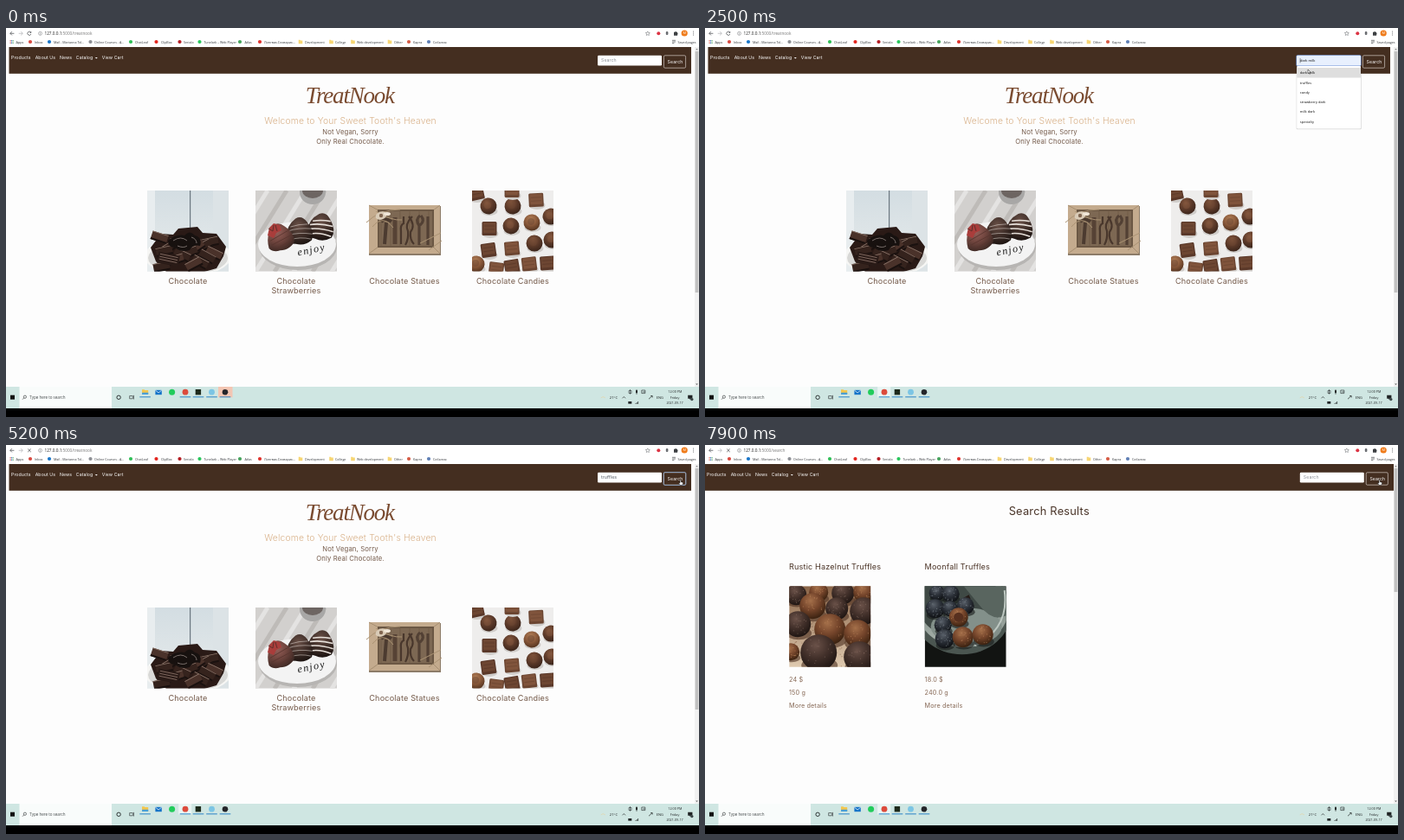
An HTML page for the animation above (8000 ms loop, 800 by 450 pixels).

```html
<!DOCTYPE html>
<html lang="en">
<head>
<meta charset="utf-8">
<title>Sweet shop search</title>
<style>
  html, body { margin: 0; width: 100%; height: 100%; overflow: hidden; background: #000; }
  svg { display: block; width: 800px; height: 450px; }
  text { white-space: pre; }
  .ui { font-family: "Open Sans", "Noto Sans", sans-serif; }
  .web { font-family: Inter, "Open Sans", sans-serif; letter-spacing: .018em; }
  .script { font-family: "Liberation Serif", "Noto Serif", serif; font-style: italic; }
</style>
</head>
<body>
<svg id="stage" viewBox="0 0 800 450" xmlns="http://www.w3.org/2000/svg"></svg>
<script>
const LOOP = 8000, STEP = 100;
const stage = document.getElementById('stage');

// Markup helpers
const rect = (x, y, w, h, fill, more = '') =>
  `<rect x="${x}" y="${y}" width="${w}" height="${h}" fill="${fill}" ${more}/>`;
const ball = (x, y, r, fill, more = '') => `<circle cx="${x}" cy="${y}" r="${r}" fill="${fill}" ${more}/>`;
const oval = (x, y, rx, ry, fill, more = '') =>
  `<ellipse cx="${x}" cy="${y}" rx="${rx}" ry="${ry}" fill="${fill}" ${more}/>`;
const shape = (d, fill, more = '') => `<path d="${d}" fill="${fill}" ${more}/>`;
const line = (d, color, w = 0.7, more = '') =>
  `<path d="${d}" fill="none" stroke="${color}" stroke-width="${w}" ${more}/>`;
const text = (x, y, size, fill, str, cls = 'web', more = '') =>
  `<text x="${x}" y="${y}" font-size="${size}" fill="${fill}" class="${cls}" ${more}>${str}</text>`;
const mid = (x, y, size, fill, str, cls = 'web', more = '') =>
  text(x, y, size, fill, str, cls, 'text-anchor="middle" ' + more);
const group = (id, body) => `<g id="${id}">${body}</g>`;
const turn = (a, x, y) => `transform="rotate(${a} ${x} ${y})"`;
const place = (x, y, a, body) => `<g transform="translate(${x} ${y}) rotate(${a})">${body}</g>`;
const photo = (id, x, y, body) =>
  `<clipPath id="${id}"><rect width="94" height="93.6"/></clipPath>` +
  `<g transform="translate(${x} ${y})"><g clip-path="url(#${id})">${body}</g></g>`;

function seeded(seed) {
  return () => (seed = (seed * 16807) % 2147483647) / 2147483647;
}

const glow = (id, light, base, dark) =>
  `<radialGradient id="${id}" cx=".42" cy=".3" r=".72"><stop offset="0" stop-color="${light}"/>` +
  `<stop offset=".5" stop-color="${base}"/><stop offset="1" stop-color="${dark}"/></radialGradient>`;
const fade = (id, top, bottom) =>
  `<linearGradient id="${id}" x2="0" y2="1"><stop stop-color="${top}"/>` +
  `<stop offset="1" stop-color="${bottom}"/></linearGradient>`;

const defs = '<defs>' +
  glow('cocoa', '#a5704a', '#75452b', '#38200f') +
  glow('dark', '#6a5148', '#42302a', '#1d1411') +
  glow('nut', '#b28058', '#8b5a3b', '#54331f') +
  glow('milk', '#87593f', '#5e3b2a', '#3a241a') +
  glow('ink', '#596069', '#2b3038', '#0d0f12') +
  glow('berry', '#95605a', '#71463f', '#402a25') +
  fade('wall', '#d3dde2', '#e8ecec') +
  fade('sand', '#8a6548', '#dfcab0') +
  fade('bowl', '#65716c', '#a9b4ad') +
  '</defs>';

// Browser frame
function browser() {
  const folder = x => shape(`M${x - 2.3} 13.8h1.8l.6 .7h2.2v3.8h-4.6z`, '#f7d673');
  const dot = c => x => ball(x, 16, 2.1, c);
  const marks = [
    [28, 33, 'Inbox', dot('#d9493f')],
    [50, 55, 'Mail - Marianna Tol…', dot('#1976c9')],
    [97.5, 102, 'Online Courses - A…', dot('#8d8f94')],
    [144, 149, 'ChatLeaf', dot('#2fbf57')],
    [173.5, 179, 'ClipBox', dot('#e3251e')],
    [200.5, 205, 'Serialo', dot('#b51c22')],
    [223.5, 228.5, 'Tunelark – Web Player', dot('#28c65c')],
    [270, 275.5, 'Atlas', dot('#45a35c')],
    [293, 298, 'Лингвик.Словарик…', dot('#e0322c')],
    [340, 345, 'Development', folder],
    [375.5, 380, 'College', folder],
    [400.5, 405, 'Web development', folder],
    [443, 448, 'Other', folder],
    [465, 470, 'Карта', dot('#d65a43')],
    [488, 493, 'События', dot('#5f7fb5')]
  ];
  let s = rect(0, 0, 800, 22, '#fff');
  s += line('M9.4 6.3H4.8M6.9 4.2L4.8 6.3L6.9 8.4', '#4b4e52', 0.75);
  s += line('M14.7 6.3H19.3M17.2 4.2L19.3 6.3L17.2 8.4', '#b4b6b9', 0.75);
  s += group('reload', line('M28.6 4.9A2.1 2.1 0 1 0 28.9 7', '#4b4e52', 0.75) + shape('M29.2 3.7v2h-2z', '#4b4e52'));
  s += group('stop', line('M25.2 4.5L28.8 8.1M28.8 4.5L25.2 8.1', '#4b4e52', 0.75));
  s += line('M37.5 6.3a2 2 0 1 0 4 0a2 2 0 1 0 -4 0M39.5 6v1.4M39.5 5v.5', '#6a6d71', 0.5);
  s += '<text x="44.5" y="8" font-size="4.7" class="ui" fill="#222">127.0.0.1<tspan id="path" fill="#777"></tspan></text>';
  s += line('M740.8 3.8l.75 1.6 1.75.2-1.3 1.2.35 1.7-1.55-.85-1.55.85.35-1.7-1.3-1.2 1.75-.2z', '#5d6064', 0.5);
  s += ball(753.3, 6.2, 2, '#dc3444') + rect(761.8, 4, 2.6, 4, '#6a6d71', 'rx="1"');
  s += shape('M771 4.8h1.3a.8 .8 0 0 1 1.6 0h1.2v1.3a.8 .8 0 0 1 0 1.5v1.2h-4.1z', '#3d4043');
  s += ball(783.2, 6, 3.6, '#ef7b1a') + mid(783.2, 7.4, 4, '#fff', 'M', 'ui');
  s += [4, 6, 8].map(y => ball(793.6, y, 0.55, '#55585c')).join('');
  for (let i = 0; i < 9; i++)
    s += rect(4.6 + (i % 3) * 1.5, 14 + Math.floor(i / 3) * 1.5, 1, 1, ['#d65548', '#4a86d8', '#4da25d'][i % 3]);
  s += text(11.5, 17.5, 3.8, '#33363a', 'Apps', 'ui');
  for (const [ix, tx, label, icon] of marks) s += icon(ix) + text(tx, 17.5, 3.65, '#33363a', label, 'ui');
  s += line('M769 14.3h4M769 16h4M769 17.7h2.4', '#4b4e52', 0.7) + text(775.5, 17.5, 3.65, '#33363a', 'Saved pages', 'ui');
  s += rect(795, 22, 5, 393, '#f1f1f1') + rect(795.6, 27, 3.8, 279, '#c1c1c1', 'id="thumb"');
  s += shape('M796.2 25.3h2.6l-1.3-1.5z', '#777') + shape('M796.2 411.5h2.6l-1.3 1.5z', '#555');
  return s;
}

// Taskbar
function taskbar() {
  const ink = '#202425';
  let s = rect(0, 415, 800, 25, '#cfe6e2') + rect(0, 440, 800, 10, '#000');
  s += rect(15.5, 415, 106.5, 25, '#f9fcfb') + rect(5, 424.7, 5, 5, '#111');
  s += line('M20.3 426.7a1.6 1.6 0 1 0 3.2 0a1.6 1.6 0 1 0 -3.2 0M20.8 427.9L19 429.7', ink, 0.6);
  s += text(27.3, 428.9, 4.5, '#44494a', 'Type here to search', 'ui');
  s += line('M127.9 427.3a2.2 2.2 0 1 0 4.4 0a2.2 2.2 0 1 0 -4.4 0', ink, 0.9);
  s += line('M142.7 425.6h3.6v3.2h-3.6zM147.5 424.9v4.6', ink, 0.6);
  s += group('alert', rect(245, 415, 16.5, 12.3, '#f3c6b3'));
  s += group('active', rect(199.2, 415, 15, 12.3, '#e9f5f3'));
  s += shape('M157 418.2h2.6l.8 .8h3.8v5h-7.2z', '#f3c64d') + rect(157, 421.7, 7.2, 2.3, '#4b9fd4', 'rx=".5"');
  s += rect(172.4, 418.8, 7.4, 5.4, '#1473c8') + line('M172.4 419l3.7 3 3.7-3', '#fff', 0.7);
  s += ball(191.6, 421.2, 3.5, '#22cc5b') + ball(207, 421.2, 3.4, '#dc4b3c');
  s += rect(218.7, 418, 6.4, 6.4, '#1d2a1b');
  s += ball(237.5, 421.2, 3.4, '#7cc5e4') + ball(253, 421.2, 3.3, '#24252a');
  for (const x of [160.6, 207, 222, 237.5, 253]) s += rect(x - 6.3, 426.4, 12.6, 0.9, '#1877c2');
  s += line('M686.8 427.8q2.3 -2.4 5 0', '#e3d7ad', 0.8) + text(696.7, 429, 4.3, ink, '21°C', 'ui');
  s += line('M711.5 428.3l1.8-1.8 1.8 1.8', ink, 0.65);
  s += line('M719 419.5h3v3h-3zM720.5 418v5.7', ink, 0.55) + rect(727, 418.4, 2, 4, ink, 'rx="1"');
  s += line('M728 422.3v1.6', ink, 0.6) + line('M733.8 419h4v3.6h-4zM735 421h3', ink, 0.6);
  s += rect(718.3, 432, 4, 2.7, ink) + line('M727 435v-1M728.3 435v-2M729.6 435v-3', ink, 0.7);
  s += line('M742 429.2l4-3.6M744.2 425.5h2v2', ink, 0.7);
  s += text(750.8, 429, 4, ink, 'ENG', 'ui');
  s += mid(772.3, 422.3, 3.7, ink, '12:00 PM', 'ui') + mid(772, 428.9, 3.7, ink, 'Friday', 'ui');
  s += mid(772, 435.4, 3.7, ink, '2021-09-17', 'ui');
  s += shape('M787.2 424.7h5.2v4.1h-2l-1.2 1.3v-1.3h-2z', ink) + ball(791.8, 429.6, 1.7, '#3a4546');
  return s;
}

// Photographs, each drawn in a 94 by 93.6 box
function chocolatePile() {
  const rnd = seeded(29);
  let s = rect(0, 0, 94, 94, 'url(#wall)') + rect(0, 0, 9, 94, '#e8edef') + rect(76, 0, 18, 94, '#dce3e6');
  s += oval(47, 76, 50, 23, '#f6f6f4') + oval(47, 78, 46, 19, '#d9d9d7') + rect(49, 0, 1.2, 46, '#6b7780');
  s += shape('M4 66L16 50 30 51 36 44 58 42 64 49 80 50 91 65 88 76 80 90 66 94H22L10 82z', '#2a1a16');
  for (let i = 0; i < 17; i++) {
    const x = 14 + (i * 29) % 66, y = 53 + i * 2 + rnd() * 4, a = -35 + rnd() * 65;
    s += place(x, y.toFixed(1), a.toFixed(0),
      rect(-9, -4, 19, 10, i % 3 ? '#35231d' : '#4a322a') + rect(-9, -4, 19, 0.8, '#8a7469') + rect(-9, 4, 19, 2.2, '#1a110f'));
  }
  s += shape('M24 58Q34 50 43 52Q49 45 55 52Q64 54 61 64Q53 62 49 69Q39 72 32 66Q24 66 24 58z', '#17110f');
  s += line('M30 58q9 -6 16 0M51 54q6 2 6 7M35 64q7 3 11 0', '#857a75', 0.9);
  s += `<g ${turn(12, 25, 79)}>` + rect(12, 73, 25, 13, '#2a1b17') +
    line('M14 75.5h21M14 78.5h21M14 81.5h21', '#9b8075', 0.7) + '</g>';
  return s;
}

function berries() {
  let s = rect(0, 0, 94, 94, '#d2d0ce');
  for (let i = -3; i < 6; i++) s += line(`M${i * 22} 94L${i * 22 + 58} 0`, i % 2 ? '#bebbb8' : '#e4e3e2', 5);
  s += oval(66, 2, 15, 14, '#a8a7a6') + oval(66, 0, 12, 9, '#6d6562') + oval(49, 65, 45, 27, '#b7b5b3') + oval(48, 62, 45, 26, '#f3f3f3');
  const fruit = (x, y, a, fill, stripe) => place(x, y, a,
    shape('M-15 11Q-16 -4 -6 -13Q1 -18 8 -10Q18 0 15 10Q7 18 -3 16Q-11 17 -15 11z', fill) + stripe);
  const drizzle = w => line('M-11 -3Q-2 -7 9 -8M-13 2Q-2 -3 13 -3M-13 7Q-1 2 15 3M-10 12Q1 7 14 9', '#e6dfd9', w);
  s += fruit(76, 41, 15, 'url(#dark)', drizzle(1.6)) + fruit(51, 46, 5, 'url(#dark)', drizzle(0.5));
  s += fruit(28, 53, -12, 'url(#berry)', line('M-12 3L12 -5M-11 8L14 1M-6 13L13 7', '#59352f', 0.8));
  s += shape('M14 52l2 -9 5 -5 7 2 2 6 -6 3 -3 6z', '#a93d3b') + line('M15 44l5 3 1 -7M23 40l2 7', '#5f302c', 1);
  s += mid(65, 72, 12, '#171717', 'enjoy', 'script', 'letter-spacing="1.4" ' + turn(-12, 66, 70));
  return s;
}

function toolBox() {
  let s = rect(0, 0, 94, 94, '#fdfdfd') + rect(6, 18, 83, 57, '#8c7c69') + rect(6, 17, 82, 56, '#c4ab8e');
  s += line('M6 17L17 23M88 17L80 23M6 73L17 65M88 73L80 65', '#9f876a', 0.8);
  s += rect(16, 22, 65, 44, '#6b5744') + rect(18, 24, 61, 40, '#7d6853');
  for (let i = 0; i < 6; i++) s += line(`M${20 + i * 11} 24v40`, '#725d49', 1);
  s += line('M24 62L26 37M20 36q6 -5 12 0', '#4c3b30', 4) + line('M36 62V31', '#564235', 5);
  s += line('M46 30v8q-4 2 -3 9v15M56 30q-9 9 -5 17 1 9 -3 16M52 30q8 10 2 18 -1 9 4 14', '#49372c', 2.2);
  s += line('M64 63V41q-5 -8 1 -12M65 40q6 -5 1 -11M74 63V30', '#524034', 3.2);
  s += line('M3 37Q18 22 42 22M10 42Q22 27 34 43M14 24Q31 35 44 34M65 61L89 49M75 69L90 58', '#aa9273', 1);
  s += oval(20, 29, 6.5, 4.5, '#d9cbb7', turn(-20, 20, 29)) + ball(20, 29, 2.2, '#816651') + oval(27, 27, 4, 2, '#f0e6d8');
  return s;
}

function candies() {
  // x, y, square or round
  const spots = [
    [5, 3, 1], [19, 18, 0], [47, 18, 0], [74, 11, 1], [20, 44, 1], [45, 41, 0], [69, 37, 0], [91, 30, 0],
    [19, 69, 1], [46, 67, 1], [72, 61, 0], [92, 57, 0], [5, 85, 0], [28, 91, 1], [46, 88, 1], [66, 85, 1],
    [87, 84, 1], [46, 0, 1]
  ];
  return rect(0, 0, 94, 94, '#eeedec') + spots.map(([x, y, square], i) => {
    const base = i % 2 ? '#6b4531' : '#5a3829', top = i % 2 ? '#80543c' : '#6d4632';
    const body = square
      ? rect(x - 8.5, y - 8, 17, 16, base, 'rx="1.5"') + rect(x - 7, y - 7, 14, 12, top, 'rx="1"') +
        line(`M${x - 6} ${y - 3}h12M${x - 6} ${y + 1}h12`, base, 0.7)
      : ball(x, y, 9.5, `url(#${i % 3 ? 'milk' : 'nut'})`) + ball(x - 1, y - 1, 4, top, 'opacity=".5"');
    return oval(x + 1, y + 6, 9.5, 5, '#cfccc9') + `<g ${turn((i * 23) % 20 - 12, x, y)}>${body}</g>`;
  }).join('');
}

function speckle(x, y, r, n, color, rnd) {
  let s = '';
  for (let i = 0; i < n; i++) {
    const a = rnd() * 6.28, d = Math.sqrt(rnd()) * r * 0.85;
    s += ball((x + Math.cos(a) * d).toFixed(1), (y + Math.sin(a) * d).toFixed(1), 0.6, color, 'opacity=".55"');
  }
  return s;
}

// Rolled sweets: x, y, radius, tone
const roll = (balls, shade, dust, rnd) => balls.map(([x, y, r, tone]) =>
  oval(x + 1, y + r * 0.7, r, r * 0.5, shade, 'opacity=".6"') + ball(x, y, r, `url(#${tone})`) +
  speckle(x, y, r, 18, tone === 'cocoa' ? '#c18a60' : dust, rnd)).join('');

function truffleTray() {
  const rnd = seeded(71);
  const balls = [
    [8, 10, 12, 'dark'], [34, 7, 11, 'cocoa'], [62, 8, 13, 'dark'], [86, 7, 12, 'cocoa'],
    [27, 23, 15, 'cocoa'], [55, 26, 13, 'dark'], [86, 29, 16, 'dark'], [10, 44, 15, 'dark'],
    [47, 50, 18, 'cocoa'], [79, 55, 16, 'cocoa'], [34, 77, 21, 'dark'], [81, 82, 18, 'dark'], [2, 76, 10, 'cocoa']
  ];
  return rect(0, 0, 94, 94, 'url(#sand)') + speckle(47, 75, 55, 90, '#795139', rnd) + roll(balls, '#4c3020', '#8c7468', rnd);
}

function truffleBowl() {
  const balls = [
    [14, 8, 9, 'ink'], [30, 9, 10, 'ink'], [47, 23, 10, 'ink'], [12, 26, 11, 'ink'], [29, 26, 9, 'ink'],
    [39, 36, 11, 'cocoa'], [21, 45, 10, 'ink'], [23, 61, 11, 'ink'], [44, 59, 12, 'cocoa'], [67, 56, 12, 'cocoa']
  ];
  let s = rect(0, 0, 94, 94, '#121412') + oval(43, 29, 57, 50, '#4b5651') + oval(44, 25, 53, 46, 'url(#bowl)');
  s += oval(40, 20, 48, 40, '#3f4945') + oval(48, 47, 41, 22, '#83908a') + shape('M45 0H94V34Q78 42 63 22z', '#59655f');
  s += line('M92 5Q98 49 58 69', '#bdc7c1', 2) + shape('M44 14l7 -4 2 5z', '#251b17');
  return s + roll(balls, '#161a18', '#8b949c', seeded(13)) + ball(39, 36, 5.5, '#57301f');
}

// Pages
function navbar(x, w, dx, ids) {
  let s = rect(x, 22, w, 30.8, '#442e20');
  for (const [tx, label] of [[6, 'Products'], [33.7, 'About Us'], [62, 'News'], [80.8, 'Catalog'], [110.8, 'View Cart']])
    s += text(tx - dx, 36.4, 5.2, '#fff', label);
  s += shape(`M${102.8 - dx} 33.9h3l-1.5 1.6z`, '#fff');
  const shift = dx ? 3.8 : 0;
  s += group(ids + 'Ring', rect(682.4, 31.2, 75.2, 13, '#6a8fd6', 'rx="1.7"'));
  s += rect(683 + shift, 31.8, 74, 11.8, '#fff', `rx="1.3" id="${ids}Box"`);
  s += text(687 + shift, 39.2, 5.2, '#8d9097', 'Search', 'web', `id="${ids}Text"`);
  s += group(ids + 'Clear', line('M748.7 36.5l2.8 2.8M751.5 36.5l-2.8 2.8', '#294b98', 0.8));
  s += group(ids + 'Caret', rect(687, 34.9, 0.5, 5.4, '#222', `id="${ids}Bar"`));
  s += rect(759.4 + shift, 31.8, 25.2, 14.4, 'none', 'rx="1.4" stroke="#e9e2de" stroke-width=".6"');
  s += group(ids + 'Focus', rect(759.1, 31.5, 25.8, 15, 'none', 'rx="1.6" stroke="#86a2c8" stroke-width=".8"'));
  return s + text(763.6 + shift, 41, 5.2, '#fff', 'Search');
}

function home() {
  const brown = '#745a4a';
  let s = navbar(3.5, 787.5, 0, 'h');
  s += mid(396.8, 87, 27, '#7a4b30', 'TreatNook', 'script', 'letter-spacing="-1.2"');
  s += mid(397.5, 111, 10.3, '#d9b28a', 'Welcome to Your Sweet Tooth\'s Heaven', 'web', 'font-weight="300"');
  s += mid(397.5, 122.8, 7.7, brown, 'Not Vegan, Sorry') + mid(397.5, 134, 7.7, brown, 'Only Real Chocolate.');
  s += photo('p1', 163, 188, chocolatePile()) + photo('p2', 288, 188, berries());
  s += photo('p3', 413, 188, toolBox()) + photo('p4', 538, 188, candies());
  for (const [x, y, label] of [[210, 296.2, 'Chocolate'], [335, 296.2, 'Chocolate'], [335, 306.6, 'Strawberries'],
    [460, 296.2, 'Chocolate Statues'], [585, 296.2, 'Chocolate Candies']]) s += mid(x, y, 9.1, brown, label);
  return s;
}

function results() {
  const product = (x, name, price, weight) => text(x, 143.8, 9.1, '#4b3427', name) +
    [price, weight, 'More details'].map((str, i) => text(x, 273.6 + i * 15.3, 7.25, '#876956', str)).join('');
  return navbar(0, 795, 4, 'r') + mid(397.3, 80.6, 12.8, '#4a3529', 'Search Results') +
    product(97, 'Rustic Hazelnut Truffles', '24 $', '150 g') + product(253.6, 'Moonfall Truffles', '18.0 $', '240.0 g') +
    group('shots', photo('p5', 97.2, 163.2, truffleTray()) + photo('p6', 253.7, 163.2, truffleBowl()));
}

function dropdown() {
  const items = ['dark milk', 'truffles', 'candy', 'strawberry dark', 'milk dark', 'specialty'];
  return rect(682.7, 44.4, 75, 72.8, '#000', 'opacity=".16" rx="1"') + rect(683.2, 44, 73.8, 72.4, '#fff', 'rx=".8"') +
    rect(683.2, 46, 73.8, 11.5, '#dedede', 'id="hover"') +
    items.map((label, i) => text(686.8, 53.3 + i * 11.25, 4, '#111', label, 'ui')).join('');
}

const pointers =
  group('arrow', shape('M0 0V4.6L1.1 3.6 1.9 5.3 2.7 4.9 1.9 3.3H3.4z', '#fff', 'stroke="#111" stroke-width=".5"')) +
  group('beam', line('M-1 -2.6h2M0 -2.6V2.6M-1 2.6h2', '#222', 0.6)) +
  group('hand', shape('M-.6 0Q0 -.7 .6 0V2.2L2.9 2.7V4.2L2.2 5.7H-.6L-2.1 3.6 -1.5 3.1 -.6 3.7z', '#fff', 'stroke="#111" stroke-width=".5"'));

stage.innerHTML = defs + rect(0, 22, 795, 393, '#fdfdfd') + browser() + group('home', home()) +
  group('results', results()) + group('menu', dropdown()) + taskbar() + group('pointer', pointers);

const $ = id => document.getElementById(id);
const show = (id, on) => $(id).style.display = on ? '' : 'none';
const ease = k => k * k * (3 - 2 * k);

// Pointer stops: time, x, y
const route = [[200, 253, 424], [1200, 696, 39], [1900, 696, 39], [2300, 696, 48], [2500, 696, 48], [2800, 697, 62],
  [3000, 697, 62], [3300, 697.6, 48.5], [3700, 697.6, 48.5], [4400, 778.6, 40.6], [LOOP, 778.6, 40.6]];

function pointerAt(t) {
  const i = Math.max(1, route.findIndex(p => p[0] >= t));
  const [t0, x0, y0] = route[i - 1], [t1, x1, y1] = route[i];
  const k = ease(Math.min(1, Math.max(0, (t - t0) / (t1 - t0))));
  return [x0 + (x1 - x0) * k, y0 + (y1 - y0) * k];
}

function draw(t) {
  const found = t >= 7000, open = t >= 1900 && t < 3000, picked = t >= 3000;
  const [x, y] = pointerAt(t);
  const focus = t >= 1400 && t < 5000;
  const row = !open || y < 46 ? -1 : y < 57.5 ? 0 : 1;
  const value = picked ? 'truffles' : row >= 0 ? ['dark milk', 'truffles'][row] : '';

  show('home', !found);
  show('results', found);
  show('shots', t >= 7400);
  show('menu', open);
  show('hover', row >= 0);
  $('hover').setAttribute('y', 46 + Math.max(0, row) * 11.25);
  $('path').textContent = found ? ':5000/search' : ':5000/treatnook';
  $('thumb').setAttribute('height', found ? 143 : 279);
  show('stop', t >= 5000);
  show('reload', t < 5000);
  show('alert', t < 600);
  show('active', t >= 600);

  show('hRing', focus && t >= 1900);
  show('hClear', picked && focus);
  show('hFocus', t >= 5000);
  show('hCaret', focus && t % 1000 >= 400 && t % 1000 < 900);
  $('hBar').setAttribute('x', picked ? 705 : 686.8);
  $('hBox').setAttribute('fill', row >= 0 ? '#e8f0fe' : '#fff');
  const field = $('hText');
  field.textContent = value || 'Search';
  field.setAttribute('fill', picked ? '#555b63' : value ? '#111' : '#8d9097');
  field.setAttribute('class', value && !picked ? 'ui' : 'web');
  field.setAttribute('font-size', value && !picked ? 4 : 5.2);
  for (const part of ['Ring', 'Clear', 'Caret', 'Focus']) show('r' + part, false);

  const overField = x > 683 && x < 757 && y > 31.8 && y < 43.6;
  const overButton = x >= 760;
  show('pointer', t >= 300);
  show('beam', overField);
  show('hand', overButton);
  show('arrow', !overField && !overButton);
  $('pointer').setAttribute('transform', `translate(${x.toFixed(2)} ${y.toFixed(2)})`);
}

function tick(now) {
  draw(Math.floor((now % LOOP) / STEP) * STEP);
  requestAnimationFrame(tick);
}
draw(0);
requestAnimationFrame(tick);
</script>
</body>
</html>
```
